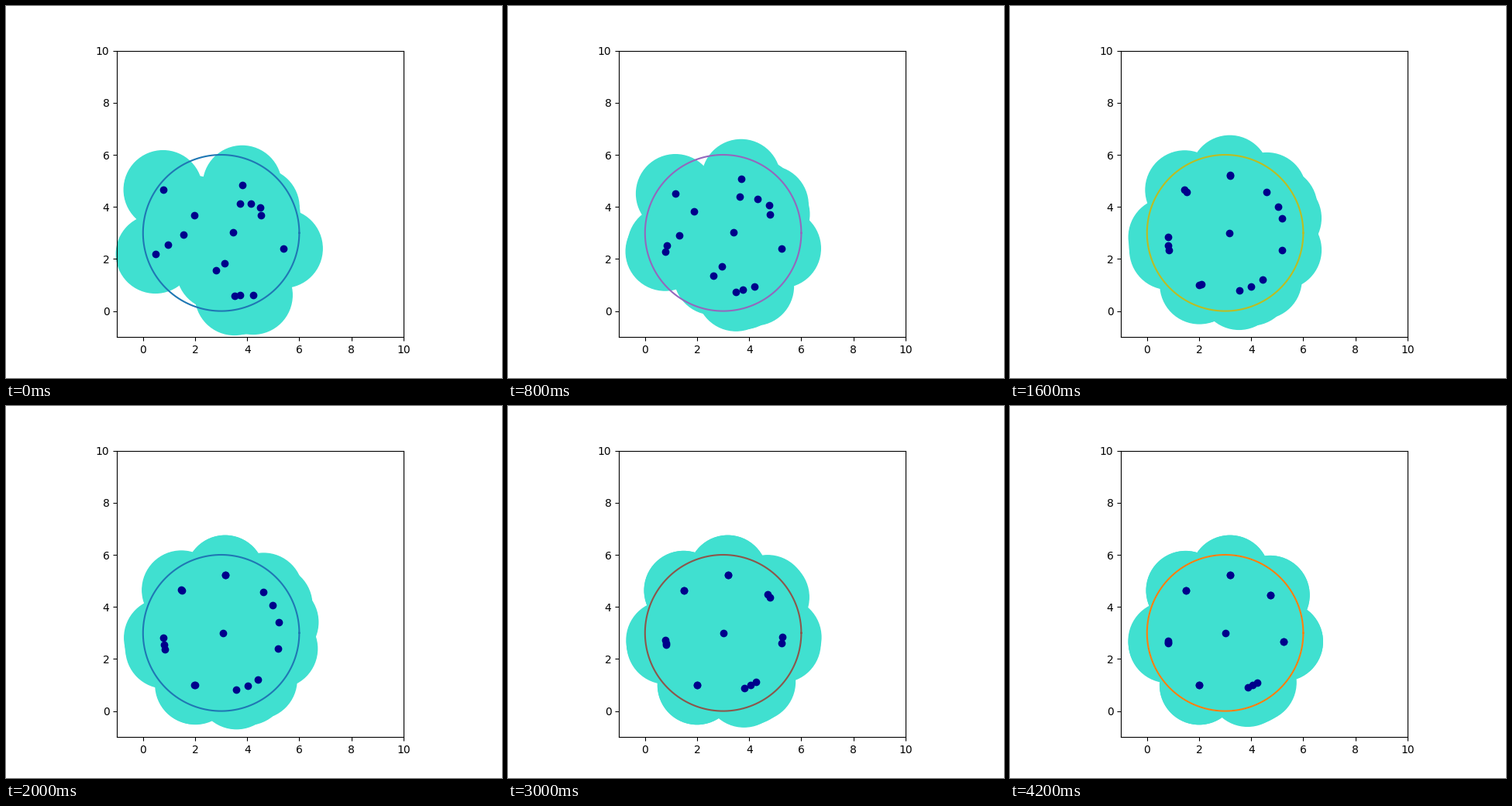
Write a matplotlib script that moves like this. It is 640 px wide and 480 px high and loops after 4400 ms.

```python
import numpy as np
import matplotlib.pyplot as plt
from matplotlib.animation import FuncAnimation

FRAMES = 22
REACH = 1.5                  # sensing radius
HUB = np.array([3.02, 2.994])
RING = 2.245                 # orbit on which the outer sensors settle

# Each group shares one resting angle; slack is the part of the way left open.
# Members: starting radius, starting angle, angle at which the ring is met.
GROUPS = [
    (133.2, 0.0, [(2.80, 143.5, 133), (1.25, 146.7, 133)]),
    (188.5, 0.2, [(1.47, 182.3, 184), (2.12, 192.2, 192), (2.67, 197.5, 197)]),
    (85.8, 0.0, [(2.01, 66.9, 87), (1.33, 58.3, 87)]),
    (40.5, 0.0, [(1.59, 45.4, 45), (1.77, 33.7, 26)]),
    (-8.4, 0.0, [(1.65, 24.5, 15), (2.44, -14.1, -17)]),
    (-117, 0.0, [(1.165, -84.9, -117), (1.446, -98.9, -118)]),
    (-62, 0.4, [(2.46, -78.5, -77), (2.48, -73.6, -64), (2.67, -63.1, -51)]),
]


def fade(n, middle, width):
    """Logistic fall from exactly 1 at the start towards 0."""
    return (1 + np.exp(-middle / width)) / (1 + np.exp((n - middle) / width))


def smoothstep(n, start, end):
    s = np.clip((n - start) / (end - start), 0, 1)
    return s * s * (3 - 2 * s)


def polar(radius, degrees):
    a = np.radians(degrees)
    return HUB + radius * np.array([np.cos(a), np.sin(a)])


def radius_at(n, start):
    """Outer sensors decay onto the ring; inner ones leave later the deeper they lie."""
    gap = RING - start
    if gap < 0:
        return RING - gap * 0.72 ** n
    return RING - gap * fade(n, 2 + 3.5 * gap, 0.9)


def positions(n):
    spots = [polar(0.43 * fade(n, 7, 1.5), 4)]
    for rest, slack, members in GROUPS:
        for radius, start, landing in members:
            angle = landing + (start - landing) * fade(n, 5, 1)
            angle += (1 - slack) * (rest - landing) * smoothstep(n, 7, 18)
            spots.append(polar(radius_at(n, radius), angle))
    return np.array(spots)


fig, ax = plt.subplots(figsize=(6.4, 4.8), dpi=100)
ax.set_aspect("equal")
ax.set(xlim=(-1, 10), ylim=(-1, 10))

discs = [ax.add_patch(plt.Circle(spot, REACH, color="turquoise", clip_on=False))
         for spot in positions(0)]
turn = np.linspace(0, 2 * np.pi, 150)
region, = ax.plot(3 + 3 * np.cos(turn), 3 + 3 * np.sin(turn))
dots, = ax.plot([], [], "o", color="darkblue")


def draw(frame):
    spots = positions(frame)
    for disc, spot in zip(discs, spots):
        disc.center = tuple(spot)
    dots.set_data(spots[:, 0], spots[:, 1])
    region.set_color(f"C{frame % 10}")
    return [*discs, region, dots]


anim = FuncAnimation(fig, draw, frames=FRAMES, interval=200, repeat=True, repeat_delay=0)
plt.show()
```
